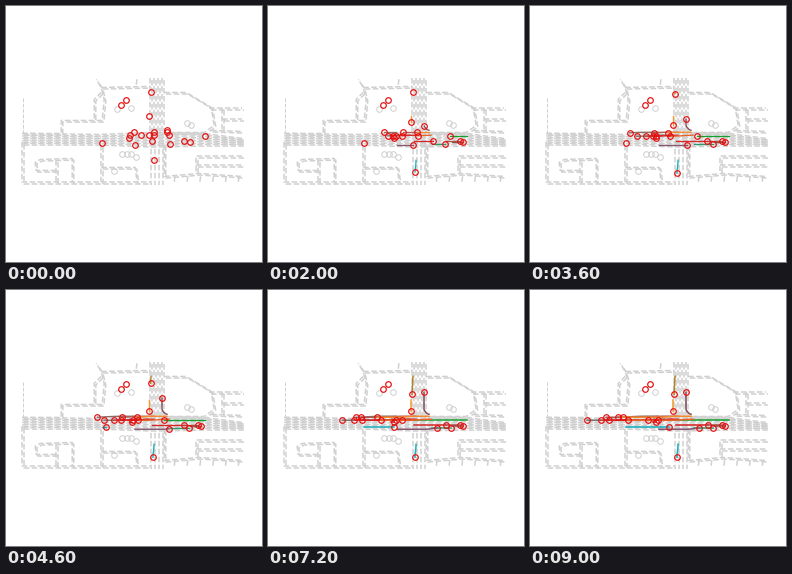
Recreate the animation shown at these times as a matplotlib script. Size 256 by 256 pixels, loop 9100 ms.

```python
import numpy as np
import matplotlib.pyplot as plt
from matplotlib.animation import FuncAnimation

SIZE, DPI, FRAMES = 256, 100, 91
PT = 72 / DPI  # points per pixel
GREY, RED, TEAL = "#d0d0d0", "#d62728", "#18b0bd"
T = np.arange(FRAMES)

fig = plt.figure(figsize=(SIZE / DPI, SIZE / DPI), dpi=DPI, facecolor="white")
ax = fig.add_axes([0, 0, 1, 1])
ax.set_xlim(1, SIZE + 1)
ax.set_ylim(SIZE + 0.75, 0.75)
ax.axis("off")


def line(*pts, lw=1.5, shift=0):
    x, y = np.array(pts, float).T + shift
    ax.plot(x, y, ls="--", color=GREY, lw=lw * PT, zorder=1)


def road(*pts):
    """Two close dashed edges."""
    for shift in (-0.8, 0.8):
        line(*pts, shift=shift)


def draw_map():
    # upper left block
    line((18, 93), (18, 129), lw=1)
    road((18, 129), (57, 129), (57, 116), (98, 116), (100, 95), (97, 83), (92, 75))
    road((90, 114), (90, 95), (97, 88))
    road((97, 83), (146, 82))
    line((132, 74), (131, 81))
    # upper right block
    road((160, 88), (182, 88), (207, 103), (210, 121), (200, 128), (160, 128))
    road((205, 104), (238, 104))
    road((218, 104), (218, 126))
    road((218, 115), (238, 115))
    road((207, 126), (238, 127))
    # lower left block
    road((18, 138), (18, 178), (146, 178))
    road((97, 141), (97, 178))
    road((52, 166), (32, 166), (31, 158), (36, 155), (68, 154), (68, 178))
    road((52, 156), (52, 178))
    road((97, 163), (131, 163), (133, 178))
    # lower right block
    road((238, 152), (192, 152), (192, 169))
    road((192, 161), (238, 161))
    road((160, 140), (160, 172), (195, 169), (238, 172))
    for x in np.linspace(170, 234, 6):
        line((x, 171), (x - 1, 179))
    # main street lanes, then the crossing street
    for k in np.linspace(0, 1, 5):
        road((18, 129 + 10 * k), (95, 130 + 9 * k), (146, 128 + 13 * k),
             (200, 129 + 11 * k), (238, 134 + 6 * k))
    for x in np.linspace(146, 158, 4):
        road((x, 74), (x, 128))
        line((x, 128), (x, 180))


def cruise(start, speed, gain):
    return start + speed * T + gain * T**2


def brake(start, dist, end, p=1.2):
    return start + dist * (1 - (1 - np.clip(T / end, 0, 1)) ** p)


def glide(start, dist, t0, t1):
    u = np.clip((T - t0) / (t1 - t0), 0, 1)
    return start + dist * u * u * (3 - 2 * u)


draw_map()

ring = dict(ls="none", marker="o", mfc="none", ms=5.6 * PT)
parked = [(112, 104), (126, 103), (182, 118), (186, 120), (117, 149),
          (122, 149), (126, 149), (131, 152), (109, 166)]
ax.plot(*zip(*parked), mec=GREY, mew=PT, zorder=2, **ring)

near = glide(130, 1, 0, 36)
far = glide(127, 1, 20, 50)
turn_y = 125 - 22 * np.clip(T / 56, 0, 1) ** 1.6

tracks = [
    # westbound
    (cruise(200, -0.86, -0.0005), 130.3, "#17a030"),
    (cruise(136, -0.74, -0.0014), near, "#6f7a74"),
    (cruise(144, -0.72, -0.0009), near, "#c8403a"),
    (cruise(149, -0.66, -0.0012), near, RED),
    (cruise(164, -0.60, -0.0014), near, "#e8642a"),
    (glide(129, -40, 0, 56), far, "#8c6d64"),
    (cruise(149, -0.60, -0.0022), far, "#b05a50"),
    (cruise(162, -0.55, -0.0023), far, "#f58a2c"),
    # eastbound
    (brake(147, 32, 38), 136, RED),
    (brake(179, 13.5, 18), 136, "#b05048"),
    (brake(185, 10.5, 16, 2), 137, "#8c564b"),
    (brake(165, 19, 36, 1.4), 139, "#2f9a68"),
    (brake(130, 40, 58), glide(140, -1, 36, 56), "#86586f"),
    (glide(97, 43, 36, 92), 138, TEAL),
    # north and south
    (brake(162, -5, 22), turn_y, "#80505c"),
    (144, brake(111, 11, 60, 2), "#f59a2c"),
    (glide(146, -1, 28, 70), glide(87, 18, 28, 70), "#b0852c"),
    (glide(149, -1, 0, 20), brake(155, 13, 26, 1.6), TEAL),
    # slow and waiting
    (brake(124, 3, 20), 133, RED),
    (glide(125, 4, 0, 72), near, RED),
    (121, 95, RED),
    (116, 100, RED),
]
tracks = [(x + 0 * T, y + 0 * T, c) for x, y, c in tracks]

trails = [ax.plot([], [], color=c, lw=1.4 * PT, zorder=3)[0] for *_, c in tracks]
agents, = ax.plot([], [], mec="#e60f0f", mew=1.2 * PT, zorder=4, **ring)


def update(n):
    for trail, (x, y, _) in zip(trails, tracks):
        trail.set_data(x[:n + 1], y[:n + 1])
        trail.set_linewidth((1.2 + 0.4 * n / FRAMES) * PT)
    agents.set_data([x[n] for x, *_ in tracks], [y[n] for _, y, _ in tracks])
    return [*trails, agents]


anim = FuncAnimation(fig, update, frames=FRAMES, interval=100, repeat=True,
                     repeat_delay=0, init_func=lambda: update(0))
plt.show()
```
